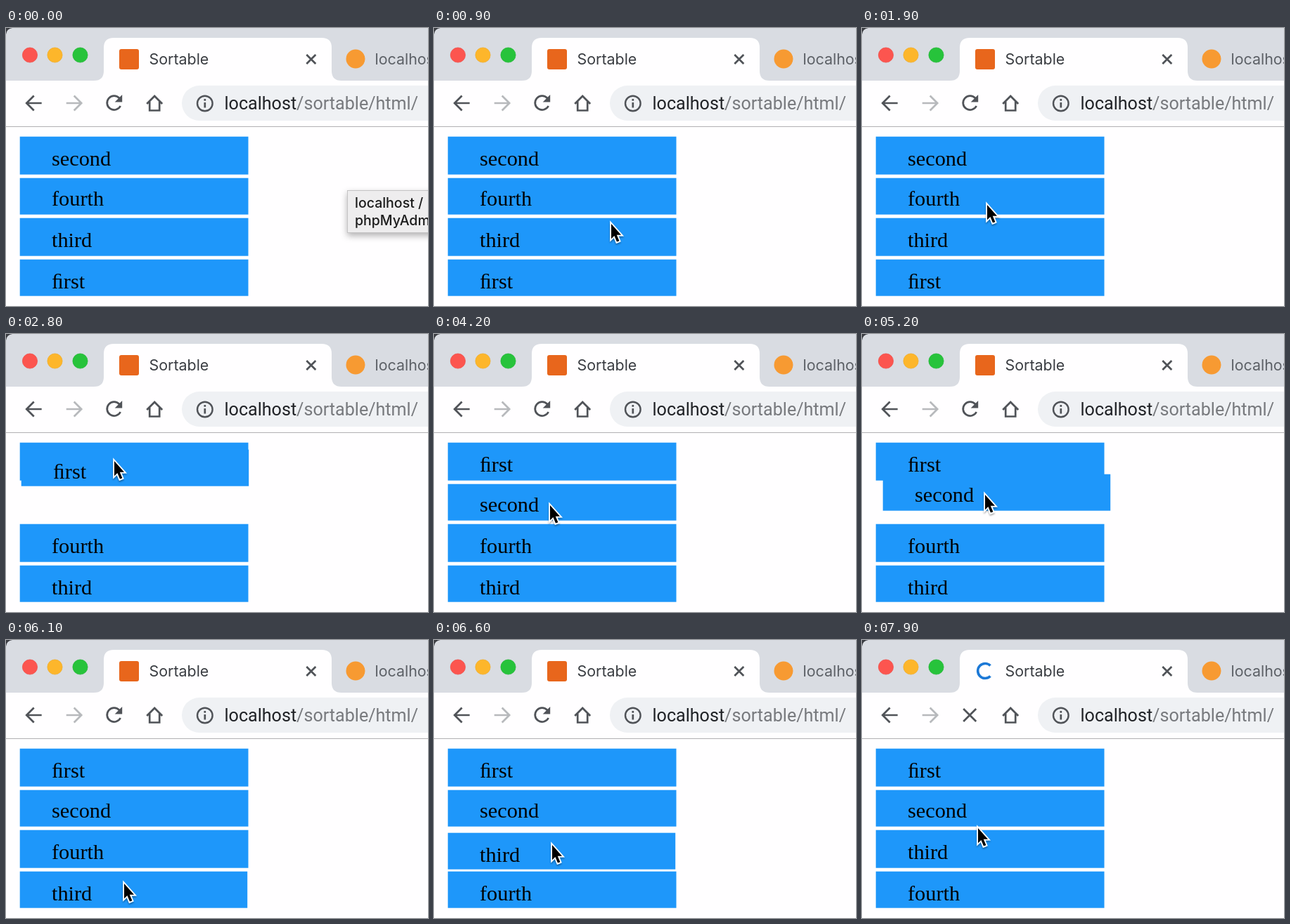
An HTML page that plays this animation: 600x396 px, repeating every 8000 ms.

```html
<!DOCTYPE html>
<html lang="en">
<head>
<meta charset="utf-8">
<title>Sortable</title>
<style>
  html, body { margin: 0; width: 100%; height: 100%; overflow: hidden; background: #fffeff; }
  svg { display: block; width: 600px; height: 396px; }
  .ui { font: 21.4px Inter, sans-serif; fill: #393c41; }
  .tip { font: 500 19.5px Inter, sans-serif; fill: #1c1c1c; }
  .url { font: 25.1px Roboto, sans-serif; fill: #202226; }
  .row { font: 30.3px "Liberation Serif", serif; }
  .line { fill: none; stroke: #505358; stroke-width: 2.7; }
</style>
</head>
<body>
<svg viewBox="0 0 600 396">
  <defs>
    <filter id="shade" x="-20%" y="-40%" width="140%" height="190%">
      <feDropShadow dx="0" dy="4" stdDeviation="5" flood-opacity=".3"/>
    </filter>
    <filter id="soft" x="-50%" y="-30%" width="200%" height="170%">
      <feDropShadow dx="0" dy="2" stdDeviation="1.3" flood-opacity=".35"/>
    </filter>
  </defs>

  <!-- tab strip -->
  <rect width="600" height="75" fill="#d9dce2"/>
  <path d="M0 0H9Q1 1 0 9Z" fill="#3b3d42"/>
  <path d="M125 75Q139 75 139 61V28Q139 14 153 14H449Q463 14 463 28V61Q463 75 477 75Z" fill="#fffeff"/>
  <g stroke-width=".7">
    <circle cx="34" cy="38.5" r="10.6" fill="#fc554f" stroke="#ee4c47"/>
    <circle cx="69.5" cy="38.5" r="10.6" fill="#fdb62b" stroke="#eeab27"/>
    <circle cx="105.5" cy="38.5" r="10.6" fill="#27c33b" stroke="#23b735"/>
  </g>
  <rect id="icon" x="161" y="30" width="28" height="29" rx="3" fill="#e8661c"/>
  <path id="spinner" d="M182.5 36.5A10.5 10.5 0 1 0 182.5 51.5" fill="none" stroke="#1b78d6" stroke-width="3.6"/>
  <text class="ui" x="203.5" y="52">Sortable</text>
  <path class="line" d="M427.3 38L440.3 51M440.3 38L427.3 51"/>
  <circle cx="497" cy="44" r="13.5" fill="#f79a32"/>
  <text class="ui" x="524.5" y="52" style="fill:#5c6066">localhost</text>

  <!-- toolbar -->
  <g transform="translate(.7 0)">
    <path class="line" d="M50 107H29M39 96.5L28.5 107L39 117.5"/>
    <path class="line" d="M85 107H106M96 96.5L106.5 107L96 117.5" style="stroke:#b7b9bc"/>
    <g id="reload">
      <path class="line" d="M162 111A10 10 0 1 1 160.5 100"/>
      <path d="M164.5 95V105.5H154Z" fill="#505358"/>
    </g>
    <path id="stop" class="line" d="M143.5 98L161.5 116M161.5 98L143.5 116"/>
    <path class="line" d="M199.5 108L210.5 97L221.5 108M203.5 105V117.5H217.5V105"/>
  </g>
  <path d="M600 82H275A25 25 0 0 0 275 132H600Z" fill="#eff1f4"/>
  <circle class="line" cx="282.8" cy="107.5" r="10.8" style="stroke-width:2.4"/>
  <path class="line" d="M282.8 106V113.5M282.8 101V103.8"/>
  <text class="url" x="310.5" y="116">localhost<tspan fill="#77797d">/sortable/html/</tspan></text>
  <path d="M0 140.5H600" stroke="#b1b0b2"/>

  <g id="rows"></g>

  <g id="tooltip">
    <rect x="485.5" y="231.5" width="150" height="60" fill="#eeedee" stroke="#c4c3c4" filter="url(#shade)"/>
    <text class="tip" x="496" y="255.5">localhost /</text>
    <text class="tip" x="496" y="280.5">phpMyAdmin</text>
  </g>

  <path id="cursor" d="M2 4V25.3L6.4 21L10 29.6L13.4 28.2L9.8 19.7H16Z" stroke="#fff" stroke-width="3.6" paint-order="stroke" filter="url(#soft)"/>
</svg>

<script>
const LOOP = 8000, STEP = 100;
const byId = id => document.getElementById(id);

// top, height and text baseline of each place in the list
const slots = [[155, 54, 41], [214, 52, 39], [271, 54, 41], [330, 52, 41]];

const orders = [
  [0, 'second fourth third first'],
  [2500, 'second fourth first third'],
  [2700, 'second first fourth third'],
  [2900, 'first second fourth third'],
  [6500, 'first second third fourth']
].map(([t, names]) => [t, names.split(' ')]);

const drags = [
  { name: 'first', start: 2300, end: 3200, slot: 3, grab: [150, 342] },
  { name: 'second', start: 4400, end: 5500, slot: 1, grab: [163, 239] },
  { name: 'third', start: 6100, end: 6800, slot: 3, grab: [166, 343] }
];

// pointer: time, x, y
const path = [
  [0, 625, 400], [200, 612, 365], [900, 250, 275], [1400, 182, 250],
  [1900, 176, 248], [2200, 150, 342], [2300, 150, 342], [2800, 152, 177],
  [3000, 152, 168], [3200, 152, 168], [3800, 163, 240], [4400, 163, 240],
  [4800, 169, 232], [5200, 173, 225], [5500, 172, 230], [5900, 166, 343],
  [6100, 166, 343], [6600, 166, 288], [6800, 166, 284], [7300, 163, 264],
  [8000, 163, 264]
];

const makeSvg = (tag, attrs, parent) => {
  const el = document.createElementNS('http://www.w3.org/2000/svg', tag);
  for (const key in attrs) el.setAttribute(key, attrs[key]);
  return parent.appendChild(el);
};

const rows = {};
for (const name of orders[0][1]) {
  const group = makeSvg('g', { class: 'row' }, byId('rows'));
  const box = makeSvg('rect', { x: -0.3, y: -0.3, fill: '#1e97fa' }, group);
  const label = makeSvg('text', { x: 45 }, group);
  label.textContent = name.replace('fi', '\ufb01'); // fi ligature
  rows[name] = { group, box, label };
}

function pointer(t) {
  const i = path.findIndex(p => p[0] > t);
  const [t0, x0, y0] = path[i - 1], [t1, x1, y1] = path[i];
  const u = (t - t0) / (t1 - t0), k = u * u * (3 - 2 * u);
  return [x0 + (x1 - x0) * k, y0 + (y1 - y0) * k];
}

function placeRow(name, x, y, width, height, base) {
  const { group, box, label } = rows[name];
  group.setAttribute('transform', `translate(${x} ${y})`);
  box.setAttribute('width', width);
  box.setAttribute('height', height);
  label.setAttribute('y', base);
}

function show(id, on) {
  byId(id).style.display = on ? '' : 'none';
}

function draw(t) {
  const [px, py] = pointer(t);
  const order = orders.filter(o => o[0] <= t).pop()[1];
  const drag = drags.find(d => t >= d.start && t < d.end);

  order.forEach((name, i) => {
    const [top, height, base] = slots[i];
    placeRow(name, 20, top, 324.8, height, base);
  });
  if (drag) {
    const [top, , base] = slots[drag.slot];
    const x = Math.round(20 + px - drag.grab[0]);
    const y = Math.round(top + py - drag.grab[1]);
    placeRow(drag.name, x, y, 323.5, 52, base);
    const { group } = rows[drag.name];
    if (group.nextSibling) group.parentNode.append(group);
  }

  byId('cursor').setAttribute('transform', `translate(${px} ${py})`);
  byId('tooltip').style.opacity = Math.max(0, 1 - t / 400);

  const loading = t >= 7800;
  show('icon', !loading);
  show('reload', !loading);
  show('spinner', loading);
  show('stop', loading);
  byId('spinner').setAttribute('transform', `rotate(${(t - 7900) * 0.36} 175 44)`);
}

function tick() {
  draw(Math.floor(performance.now() % LOOP / STEP) * STEP);
  requestAnimationFrame(tick);
}
tick();
</script>
</body>
</html>
```
